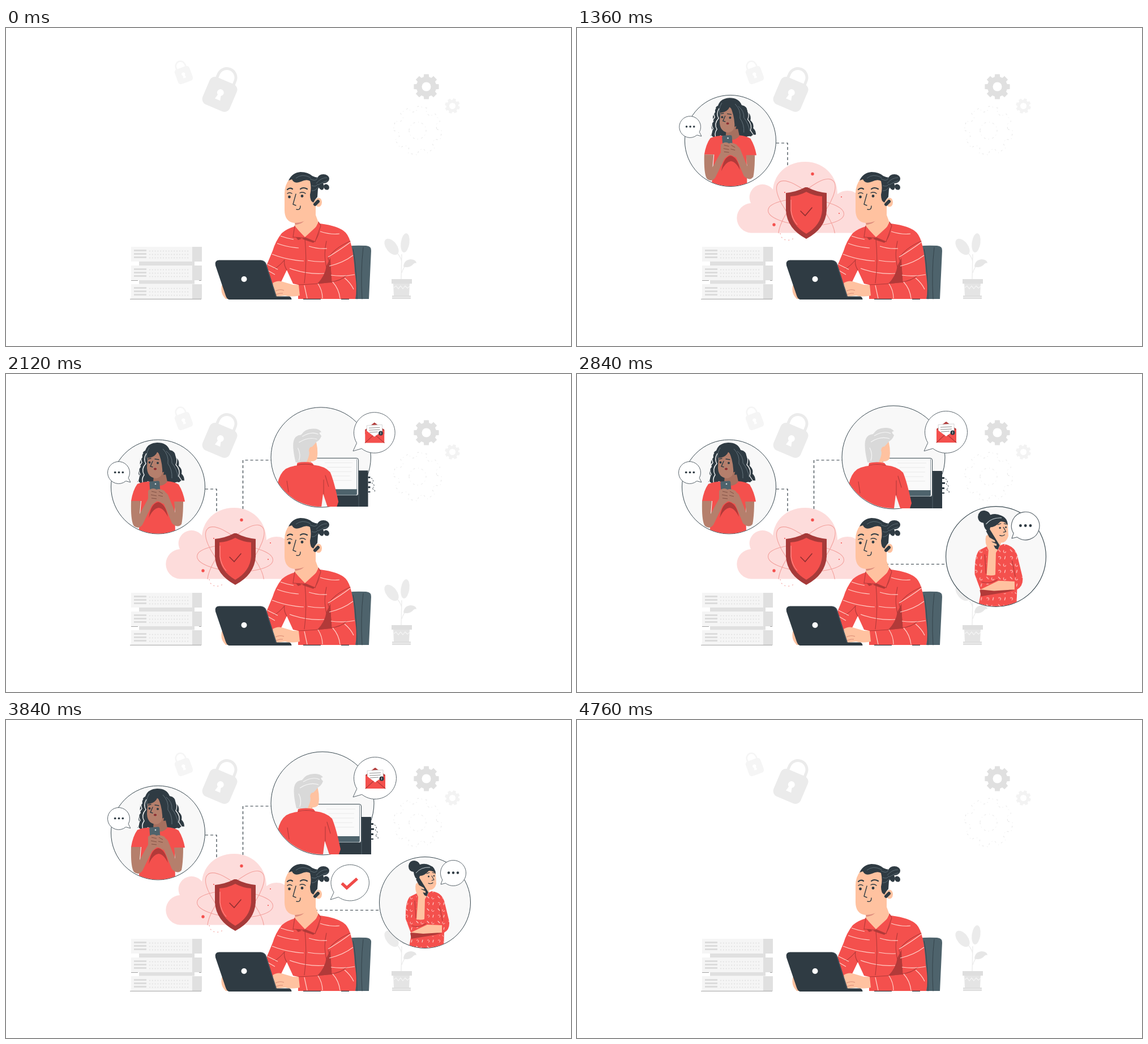
An HTML page for the animation above (4.8 s loop, 998 px wide and 561 px high).

```html
<!DOCTYPE html>
<html lang="en">
<head>
<meta charset="utf-8">
<title>Secure cloud team</title>
<style>
  html, body { margin: 0; width: 100%; height: 100%; overflow: hidden; background: #fff; }
  svg { display: block; width: 100vw; height: 100vh; }
  .red { fill: #f4504d; }
  .wine { fill: #b23a39; }
  .dark { fill: #2f3b43; }
  .slate { fill: #4e636c; }
  .skin { fill: #ffc2a0; }
  .brown { fill: #b57f6c; }
  .pale { fill: #f5f5f5; }
  .mid { fill: #e0e0e0; }
  .white { fill: #fff; }
  .line { fill: none; stroke: #2f3b43; stroke-width: 1.4; stroke-linecap: round; stroke-linejoin: round; }
  .seam { fill: none; stroke: #b23a39; stroke-width: 1.1; stroke-linecap: round; }
  .stripe { fill: none; stroke: #ffd2ca; stroke-width: 1.2; }
  .ring { fill: #f8f8f8; stroke: #37474f; stroke-width: 1; }
  .bubble { fill: #fff; stroke: #59646b; stroke-width: 1; stroke-linejoin: round; }
  .orbit { fill: none; stroke: #f3a19d; stroke-width: 1.1; }
  .link { fill: none; stroke: #2f3b43; stroke-width: 1.2; }
</style>
</head>
<body>
<svg viewBox="0 0 998 561" preserveAspectRatio="none">
  <defs>
    <clipPath id="ring1"><circle cx="268.5" cy="199" r="82.5"/></clipPath>
    <clipPath id="ring2"><path d="M468 147A91 91 0 0 1 650 147V60H700V237H559A91 91 0 0 1 468 147Z"/></clipPath>
    <clipPath id="ring3"><circle cx="740" cy="322" r="80"/></clipPath>
    <clipPath id="cloudClip"><rect x="270" y="230" width="270" height="132"/></clipPath>
    <pattern id="specks" width="19" height="22" patternUnits="userSpaceOnUse">
      <path d="M3 3l3 3M14 14l-1 4" stroke="#ffd8d2" stroke-width="1.1" stroke-linecap="round"/>
      <path d="M12 4a2 2 0 1 0 3 2M3 15a2 2 0 1 1 2 3" fill="none" stroke="#ffd8d2" stroke-width=".9"/>
    </pattern>
    <g id="lock">
      <path d="M-16-22V-32A16 16 0 0 1 16-32V-22" fill="none" stroke="currentColor" stroke-width="5"/>
      <rect x="-26" y="-26" width="52" height="52" rx="10" fill="currentColor"/>
      <path class="white" d="M-3 2A6 6 0 1 1 3 2L5 10H-5Z"/>
    </g>
    <g id="server">
      <path class="pale" d="M221 0H329V26H221Z"/>
      <path class="mid" d="M329 0H346V26H329Z"/>
      <path d="M226 6.5H248M226 12.5H248M226 18.5H248" stroke="#dcdcdc" stroke-width="3"/>
      <path d="M254 7.5H323M254 13.5H323M254 19.5H323" stroke="#e0e0e0" stroke-width="2.2" stroke-linecap="round" stroke-dasharray="0 4.8"/>
    </g>
    <g id="dots" class="dark">
      <circle cx="-8" r="2.2"/><circle r="2.2"/><circle cx="8" r="2.2"/>
    </g>
  </defs>

  <!-- backdrop -->
  <use href="#lock" color="#ebebeb" transform="translate(377.5 117) rotate(23)"/>
  <use href="#lock" color="#f5f5f5" transform="translate(314 83) rotate(-20) scale(.53)"/>
  <path id="gearA" fill="#e0e0e0" fill-rule="evenodd"/>
  <path id="gearB" fill="#f3f3f3" fill-rule="evenodd"/>
  <path id="gearC" fill="none" stroke="#dedede" stroke-width=".8" stroke-dasharray="3 5 1 6"/>

  <path class="mid" d="M235 412H333V419H235ZM235 445H333V451.5H235Z"/>
  <use href="#server" y="386"/>
  <use href="#server" y="419"/>
  <use href="#server" y="452"/>
  <path d="M221 445.5H233M341 445.5H345M219 478.3H345" stroke="#8b8b8b" stroke-width=".8"/>

  <g>
    <path d="M698 443L699 399M699 412Q697 403 690 396M699 432Q702 422 708 417" fill="none" stroke="#ececec" stroke-width="1.4"/>
    <ellipse cx="681" cy="386" rx="9.5" ry="16.5" fill="#ebebeb" transform="rotate(-38 681 386)"/>
    <ellipse cx="705" cy="379" rx="7.5" ry="17" fill="#ebebeb" transform="rotate(8 705 379)"/>
    <path d="M702 421Q703 409 715 408Q725 409 725 415Q722 413 718 418Q711 424 702 421Z" fill="#e6e6e6"/>
    <path d="M684 451H713L712 472H685Z" fill="#e4e4e4"/>
    <path d="M681 443H717V451H681ZM682 472H715V478H682Z" fill="#dedede"/>
    <path d="M685 458l4-3 4 5 4-5 4 5 4-5 4 4 4-3M682 475H715" fill="none" stroke="#f5f5f5" stroke-width="1.2"/>
  </g>

  <!-- links -->
  <path class="link" id="link1" d="M372 242V203H351"/>
  <path class="link" id="link2" d="M418.500 238V152H468"/>
  <path class="link" id="link3" d="M500 335.500H660"/>

  <!-- cloud and shield -->
  <g id="cloud">
    <path fill="#fddcdb" d="M307 361.500A26.300 26.300 0 0 1 307 309A23 23 0 0 1 346 285C349 255 373 236 403 236C435 236 460 260 460 293Q470 285 484 287.500Q498 291 502 307Q529 308 529 335Q529 361.500 503 361.500Z"/>
    <g class="orbit" clip-path="url(#cloudClip)">
      <ellipse cx="404.500" cy="325" rx="67" ry="23" transform="rotate(3 404.500 325)"/>
      <ellipse cx="404" cy="324" rx="70" ry="26" transform="rotate(47 404 324)"/>
      <ellipse cx="406" cy="322" rx="70" ry="26" transform="rotate(-49 406 322)"/>
    </g>
    <path class="orbit" d="M359 362Q361 376 376 374L386 370" stroke-dasharray="2 5"/>
    <path d="M403 281Q388 289 369 291V322Q371 354 405 372Q439 354 441 322V291Q422 289 407 281Z" fill="#a63a39"/>
    <path class="red" d="M405 289Q392 296 377 297V322Q379 348 405 363Q431 348 433 322V297Q418 296 405 289Z"/>
    <path d="M378 303V322Q380 337 389 347" fill="none" stroke="#ff9d98" stroke-width="1"/>
    <path d="M395 323L403 331L415 317" fill="none" stroke="#8f2f30" stroke-width="1.6" stroke-linecap="round"/>
    <g class="red"><circle cx="416" cy="257.500" r="2.700"/><circle cx="348" cy="347" r="2.700"/><circle cx="367" cy="290" r="1"/><circle cx="467" cy="298" r="1"/><circle cx="463" cy="327" r="1"/></g>
  </g>

  <!-- woman with phone -->
  <g id="pop1">
    <circle class="ring" cx="268.500" cy="199" r="83"/>
    <g clip-path="url(#ring1)">
      <path class="dark" d="M267 121Q284 121 289 134Q300 136 300 147Q307 152 305 162Q312 168 310 176Q315 180 315 188Q309 187 306 191Q300 189 295 194Q285 194 276 198L250 189Q245 201 239 196Q238 190 232 190Q237 184 235 178Q232 170 238 164Q234 154 241 147Q239 138 246 135Q250 122 267 121Z"/>
      <path d="M242 139Q236 149 240 156Q231 167 237 177Q231 186 235 193M248 140Q242 150 247 158Q238 168 244 178Q238 186 243 195" fill="none" stroke="#fff" stroke-width="1.300"/>
      <path class="red" d="M232 194Q245 189 258 190L284 189Q298 190 305 195Q313 208 316 225L298 227L299 284H234L239 224L221 224Q224 205 232 194Z"/>
      <path fill="#a6705f" d="M261 178L281 172L285 190Q274 203 260 192Z"/>
      <path class="brown" d="M250 148Q263 148 268 136Q275 151 276 167Q278 182 265 184Q250 183 249 166Z"/>
      <path class="dark" d="M266 137Q277 144 275 157Q282 165 278 178L290 176L286 148L274 131Z"/>
      <path class="wine" d="M252 254Q256 228 269 226Q282 229 286 252Q278 236 269 236Q259 238 252 254Z"/>
      <path class="brown" d="M221 224H238L236 247L255 213Q262 206 268 213L270 222Q263 227 258 231L241 266Q234 275 226 268Q220 260 221 224Z"/>
      <path class="brown" d="M313 225H297L299 245L286 213Q278 203 270 208L267 218Q270 227 279 229L293 263Q303 273 310 265Q313 250 313 225Z"/>
      <rect class="slate" x="254" y="189" width="18" height="25" rx="3" transform="rotate(-4 263 201)"/>
      <path class="brown" d="M251 206Q259 199 266 204Q270 201 280 206L285 216Q276 229 266 224Q255 229 251 219Z"/>
      <path d="M257 207l9 2M256 213l10 2M257 219l9 1M270 207l7 4M269 214l8 2" fill="none" stroke="#805044" stroke-width="1"/>
      <circle cx="264" cy="194" r="1.300" fill="#d6dde0"/>
      <path class="line" d="M251 150l5-1M263 150l7 1M259 154l-4 9 4 1"/>
      <g class="dark"><circle cx="253.500" cy="156" r="2"/><circle cx="268" cy="157" r="2"/></g>
      <ellipse cx="263.500" cy="167.500" rx="2.500" ry="2" fill="#8c2f33"/>
      <path d="M253 130Q245 143 251 154M277 132Q288 143 286 158Q294 169 293 184M283 136Q294 145 293 157Q302 168 304 182" fill="none" stroke="#71818a" stroke-width=".8"/>
      <path d="M299 141Q304 152 300 160Q309 170 305 180L311 189" fill="none" stroke="#fff" stroke-width="1.200"/>
    </g>
  </g>
  <g id="bubble1">
    <path class="bubble"/>
    <use href="#dots" transform="translate(199.500 173.500) scale(.85)"/>
  </g>

  <!-- man at desktop -->
  <g id="pop2">
    <circle class="ring" cx="559" cy="147" r="91"/>
    <g clip-path="url(#ring2)">
      <path class="dark" d="M571 171H645V237H571Z"/>
      <path d="M628 172V237" stroke="#52626a" stroke-width="1"/>
      <path fill="#fafafa" stroke="#37474f" d="M540 148.500H624Q627.500 148.500 627.500 152V213Q627.500 216.500 624 216.500H540Z"/>
      <path class="slate" d="M540 205H625V213Q625 215.500 622 215.500H540Z"/>
      <path d="M624.500 150V214" stroke="#71818a" stroke-width=".8"/>
      <path d="M566 157H617M570 165H615M574 173H615M578 181H612M580 189H615" stroke="#e9e9e9" stroke-width="1"/>
      <path class="skin" d="M521 128L548 112Q555 130 552 149Q549 155 540 154L546 166H518Z"/>
      <path d="M513 156Q507 131 509 119Q511 107 523 106Q530 95 544 95Q555 94 560 101Q553 101 560 108Q557 116 551 119Q547 124 543 128Q538 127 537 135Q540 141 532 157Z" fill="#d9d9d9"/>
      <path d="M525 109Q542 99 554 105M519 120Q536 109 552 114M517 130Q523 142 519 153" fill="none" stroke="#f6f6f6" stroke-width="1.200"/>
      <path class="red" d="M516 157Q530 154 543 157L546 161Q566 163 576 174Q583 190 591 228L588 237H565L567 238H480V195Q484 176 495 168Q504 163 515 162Z"/>
      <path class="pale" d="M563 213L571 237H560Z"/>
      <path class="seam" d="M516 161Q530 158 545 161M567 180L573 200M564 188V214M497 190L500 210"/>
    </g>
    <path d="M645 182h4v3h-4M645 191h5v3h-5M645 200h4v3h-4M645 209h4v2h-4" class="dark"/>
    <path d="M651 185q6 4 1 9q8 4 0 10q8 2 4 7" class="line" stroke-dasharray="2 3" style="stroke-width:1"/>
  </g>
  <g id="bubble2">
    <path class="bubble"/>
    <path class="wine" d="M635 97L652 84L670 97V105H635Z"/>
    <path class="white" stroke="#d5d5d5" d="M638 89.500L666 88V112H639Z"/>
    <path d="M642 94L662 93M642 98L662 97M643 102L658 101" stroke="#8c8c8c" stroke-width="1"/>
    <path class="red" d="M635 97L652 110L670 97V121H635Z"/>
    <path class="seam" d="M635 121L649 108M670 121L655 108"/>
    <circle class="dark" cx="663.500" cy="103.500" r="4"/>
    <path d="M663.500 101.500v4" stroke="#fff" stroke-width=".8"/>
  </g>

  <!-- woman on call -->
  <g id="pop3">
    <circle class="ring" cx="740" cy="322" r="80.500"/>
    <g clip-path="url(#ring3)">
      <path class="skin" d="M728 275Q738 268 746 262Q757 262 759 270L760 289Q757 300 748 300L747 309H729Z"/>
      <path class="dark" d="M720 268Q711 267 711 258Q712 248 721 248Q729 249 731 255Q740 252 748 256Q759 260 759 272Q755 265 747 266Q739 275 731 275L729 282Q721 280 720 268Z"/>
      <path class="red" id="blouse" d="M727 305Q739 309 752 302Q769 304 774 319L783 356Q784 370 774 375L773 406H711L716 378L706 351Q705 322 713 312Z"/>
      <path class="wine" d="M714 376Q739 370 770 376L758 379L716 386Z"/>
      <path class="skin" d="M715 375L744 361L770 362V375L737 377Z"/>
      <path class="skin" d="M725 352L728 312Q721 299 724 289L731 284L743 290L746 306L740 316L739 353Z"/>
      <path class="red" d="M721 350Q731 356 742 350L741 359Q728 367 715 362Z"/>
      <path d="M713 312Q722 306 726 312L724 350L741 352V359L716 374L706 351Q705 322 713 312ZM742 306L752 302Q769 304 774 319L783 356Q784 370 774 375L771 362L742 359ZM715 386L773 379V406H711Z" fill="url(#specks)"/>
      <path class="seam" d="M722 319L724 349M766 329L771 354M742 359Q730 367 717 363"/>
      <path class="dark" d="M724 281L730 278L746 304L743 311L739 309Z"/>
      <path class="skin" d="M727 290L738 296L739 299L729 297ZM730 297L741 302V305L731 303Z"/>
      <path class="line" d="M743 271l5-2M753 269l4 1M752 275l4 7-4 1M746 288q5 2 8-1" style="stroke-width:1.100"/>
      <g class="dark"><circle cx="746.500" cy="276" r="1.500"/><circle cx="756" cy="275" r="1.300"/></g>
      <path d="M724 270Q733 259 749 260" fill="none" stroke="#c3cdd1" stroke-width="1"/>
    </g>
  </g>
  <g id="bubble3">
    <path class="bubble"/>
    <use href="#dots" transform="translate(790 269.500)"/>
  </g>

  <!-- man with laptop -->
  <g>
    <path class="slate" d="M606 385Q614 383 636 384Q646 385 645 393L641 478H612Z"/>
    <path class="line" d="M631 387Q626 430 629 478M613 390Q619 420 620 478" style="stroke-width:.800"/>
    <path class="red" d="M510 350Q496 354 487 362Q476 376 471 393L458 424L468 453L484 452L496 427L507 451L516 453V478H617Q621 460 616 430Q613 375 600 361Q588 349 555 345L548 342Z"/>
    <path class="wine" d="M573 405L575 449Q563 450 550 451Q563 438 566 420Z"/>
    <path class="seam" d="M608 376Q579 389 569 406Q574 422 575 449M566 376Q560 400 567 426M516 453Q550 452 573 448Q592 446 602 436M496 427Q490 417 492 409M474 425Q483 420 492 409"/>
    <path class="stripe" d="M479 380Q498 387 517 388M485 367Q496 371 508 373M470 399Q495 409 526 411M462 417L480 426M463 428L475 435M555 359Q574 365 589 363M535 385Q550 390 567 389M501 424Q530 435 562 433M533 410Q550 413 563 412M569 404Q592 390 608 378M571 420Q596 414 613 401M574 436Q596 439 616 435M527 454L532 477M551 451Q559 463 559 477M577 448Q588 460 590 477M598 441Q609 450 614 461"/>
    <path class="wine" d="M509 366L528 374L543 379Q550 373 555 357L548 372L530 369L516 374Z"/>
    <path class="skin" d="M510 338V350L528 369L553 346L547 330Z"/>
    <path fill="#dd8c7c" d="M510 343Q522 342 529 335Q527 345 511 347Z"/>
    <path class="red" d="M510 349L507 369L527 370ZM552 342L556 349L546 377L529 370Q545 359 552 342Z"/>
    <path class="seam" d="M510 349L507 369L527 370M552 342L556 349L546 377L529 370M528 372Q532 414 527 450"/>
    <path class="skin" d="M501 266Q492 277 492 292V321Q492 343 511 344Q529 343 538 332L547 337V300L540 264Z"/>
    <ellipse class="skin" cx="552" cy="307.500" rx="6" ry="8"/>
    <g class="dark">
      <path d="M499 269Q506 255 520 254Q533 254 541 261Q547 264 552 264L556 276L551 284L550 298Q546 302 543 308Q537 306 537 294Q540 282 537 270Q531 266 521 271Q509 276 505 267Z"/>
      <ellipse cx="560.500" cy="266" rx="10.500" ry="8"/>
      <ellipse cx="556" cy="277" rx="5" ry="9" transform="rotate(-20 556 277)"/>
      <ellipse cx="566" cy="280.500" rx="4.500" ry="5.500" transform="rotate(-40 566 280.500)"/>
    </g>
    <path d="M537 266Q548 272 550 264M548 274Q556 264 567 264M551 277Q563 270 568 270M540 278Q548 281 551 275M540 287Q546 288 552 280M512 265Q523 256 538 264" fill="none" stroke="#66767e" stroke-width=".8"/>
    <path d="M546 311L551 306" stroke="#2f3b43" stroke-width="6" stroke-linecap="round"/>
    <path class="line" d="M497 285Q501 281 506 284M520 284Q525 280 532 284" style="stroke-width:2.200"/>
    <path class="line" d="M497 292Q501 289 505 292M519 291Q524 288 529 292M512 293L507 311L512 313M513 320Q520 322 520 314"/>
    <g class="dark"><circle cx="500.500" cy="298" r="2.400"/><circle cx="523" cy="296.500" r="2.400"/></g>
    <path class="skin" d="M381 454Q379 466 384 473L388 478H395L385 453ZM471 450Q480 444 490 448L507 453H517L519 472Q504 475 493 472L477 474Z"/>
    <path d="M476 464Q484 460 491 463M477 470Q485 467 489 468" fill="none" stroke="#d98a74"/>
    <path class="dark" d="M370 419Q368 410 376 409.500H450Q458 410 460 417L478 473.500H500Q504 474 504.500 479H394Q390 478 388 472Z"/>
    <path d="M451 410Q457 411 459 417L477 474" fill="none" stroke="#53636c" stroke-width=".8"/>
    <circle class="white" cx="420.500" cy="443" r="5"/>
    <path d="M525 478.400H556M592 478.400H606" stroke="#37474f" stroke-width="1.200"/>
  </g>

  <g id="check">
    <path class="bubble"/>
    <path d="M594 287L603 295.500L622 278.500" fill="none" stroke="#f04a48" stroke-width="5.500"/>
  </g>
</svg>
<script>
  const LOOP = 4800, STEP = 40, OUT = 4760, HALF = 237, BEAT = 840;
  const $ = id => document.getElementById(id);

  // Eight-toothed wheel with a round hole.
  function gear(id, x, y, r, hole, turn = 0) {
    let d = '';
    for (let i = 0; i < 8; i++) {
      for (const [off, k] of [[-.27, .79], [-.19, 1], [.19, 1], [.27, .79]]) {
        const a = i * Math.PI / 4 + off + turn;
        d += `${d ? 'L' : 'M'}${x + r * k * Math.cos(a)} ${y + r * k * Math.sin(a)}`;
      }
    }
    d += `ZM${x - hole} ${y}a${hole} ${hole} 0 1 0 ${2 * hole} 0a${hole} ${hole} 0 1 0 ${-2 * hole} 0Z`;
    $(id).setAttribute('d', d);
  }
  gear('gearA', 742.5, 103.5, 22.5, 8);
  gear('gearB', 788.5, 137.5, 13.5, 5.5, .3);
  gear('gearC', 727, 181, 43, 15, .2);

  // Oval speech bubble whose tail ends at (tx, ty).
  function bubble(id, x, y, rx, ry, tx, ty) {
    const a = Math.atan2((ty - y) / ry, (tx - x) / rx);
    const at = b => `${x + rx * Math.cos(b)} ${y + ry * Math.sin(b)}`;
    $(id).querySelector('.bubble').setAttribute('d',
      `M${at(a + .18)}A${rx} ${ry} 0 1 1 ${at(a - .18)}L${tx} ${ty}Z`);
  }
  bubble('bubble1', 199, 174, 19.5, 19.5, 220, 191);
  bubble('bubble2', 652, 102.5, 37.5, 37, 613, 136);
  bubble('bubble3', 790, 270, 22.5, 22.5, 768, 290);
  bubble('check', 609, 286, 35, 33, 573, 317);

  // id, beat on which it enters, scaling origin
  const pops = [
    ['cloud', 0, 404, 306],
    ['pop1', 1, 351, 199], ['bubble1', 1, 220, 191],
    ['pop2', 2, 468, 147], ['bubble2', 2, 613, 136],
    ['pop3', 3, 740, 322], ['bubble3', 3, 768, 290],
    ['check', 4, 573, 317]
  ];
  const links = [['link1', 1], ['link2', 2], ['link3', 3]];

  // Damped spring from 0 to 1, first overshoot 19 %.
  function spring(t) {
    if (t <= 0) return 0;
    const x = t / HALF, a = Math.PI * x;
    return x > 3.2 ? 1 : 1 - Math.exp(-1.66 * x) * (Math.cos(a) + .528 * Math.sin(a));
  }

  // Time since entry, or time left before the exit, whichever is shorter.
  const age = (t, beat) => Math.min(t - beat * BEAT, OUT - t);

  function draw(t) {
    for (const [id, beat, x, y] of pops) {
      const s = spring(age(t, beat)), el = $(id);
      el.style.display = s > 0 ? '' : 'none';
      el.setAttribute('transform', `translate(${x} ${y}) scale(${s}) translate(${-x} ${-y})`);
    }
    for (const [id, beat] of links) {
      const el = $(id), p = Math.max(0, Math.min(1, age(t, beat) / 240));
      const len = el.getTotalLength() * p;
      el.style.display = p > 0 ? '' : 'none';
      el.style.strokeDasharray = '5 4 '.repeat(len / 9) + Math.min(5, len % 9) + ' 999';
    }
  }

  const start = performance.now();
  function tick() {
    const t = (performance.now() - start) % LOOP;
    draw(Math.floor(t / STEP) * STEP);
    requestAnimationFrame(tick);
  }
  tick();
</script>
</body>
</html>
```
